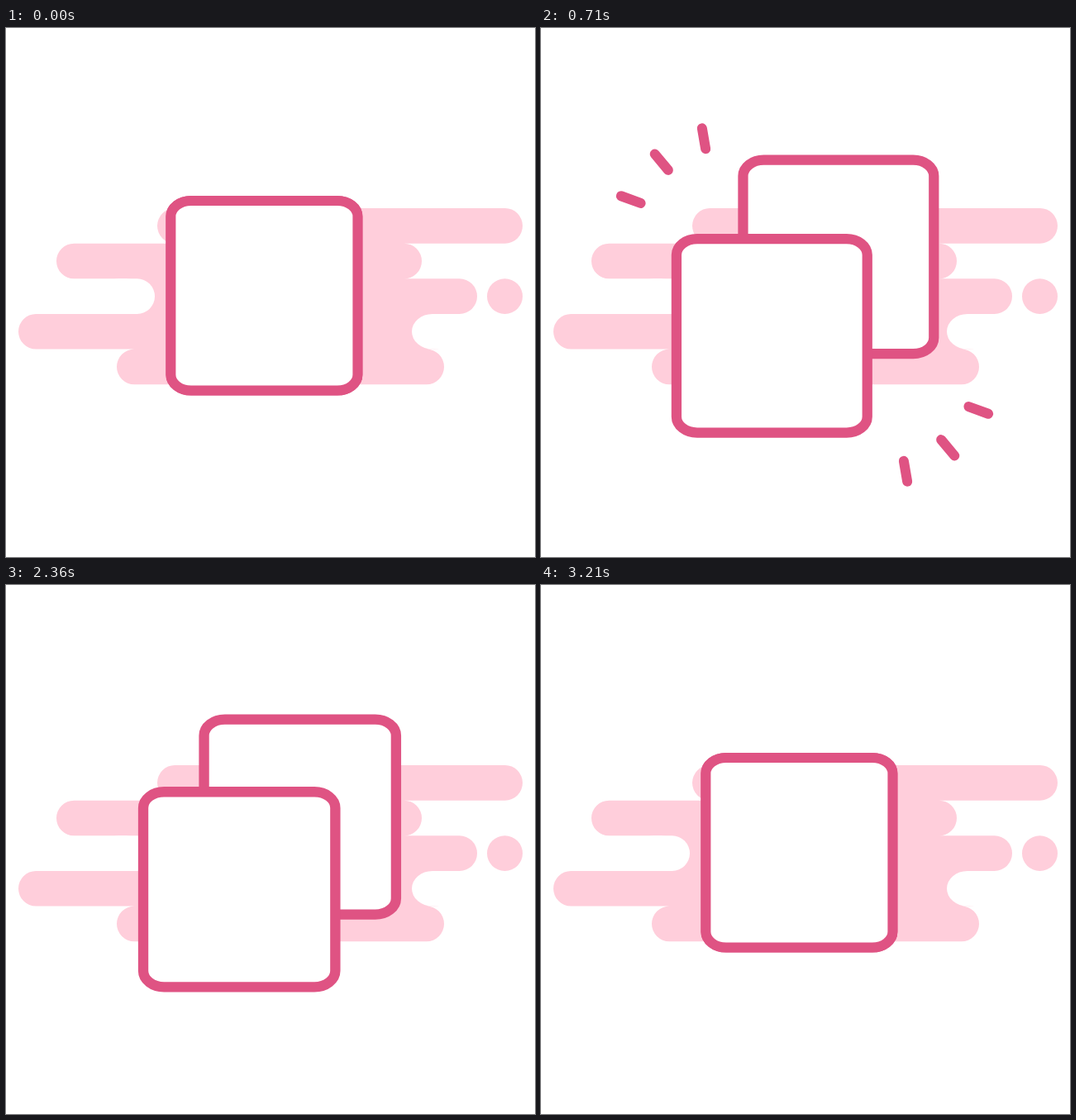
Animation, 640 px wide and 640 px high, one loop 3570 ms. Source, as an HTML page with a canvas:

```html
<!DOCTYPE html>
<html lang="en">
<head>
<meta charset="utf-8">
<title>Split squares</title>
<style>
html, body { margin: 0; width: 100%; height: 100%; overflow: hidden; background: #fff; }
canvas { display: block; width: 100vw; height: 100vh; }
</style>
</head>
<body>
<canvas id="stage"></canvas>
<script>
const SIZE = 640, LOOP = 3570, STEPS = 50;
const PINK = '#df5383', PALE = '#ffcedb', WHITE = '#fff';
const STROKE = 12, GROW = 0.098;
const CENTER = { x: 312.4, y: 323.7 };
const BACK = { x: 61, y: -58.7, bow: -1.7 };
const FRONT = { x: -42.5, y: 62, bow: 0.7 };
const TOP = 218, ROW = 42.65;

const canvas = document.getElementById('stage');
const ctx = canvas.getContext('2d');
const ratio = window.devicePixelRatio || 1;
canvas.width = canvas.height = SIZE * ratio;

// Smooth 0..1 ramp between two steps
function ramp(k, from, to) {
  const u = Math.min(1, Math.max(0, (k - from) / (to - from)));
  return u * u * (3 - 2 * u);
}

function addBar(path, row, left, right, rx = ROW / 2) {
  path.roundRect(left, TOP + row * ROW, right - left, ROW, { x: rx, y: ROW / 2 });
}

const bars = new Path2D();
[[183, 625], [61, 503], [130, 570], [15, 540], [134, 530]]
  .forEach(([left, right], row) => addBar(bars, row, left, right));
addBar(bars, 2, 582, 625);

const notches = new Path2D();
addBar(notches, 2, 115, 180);
addBar(notches, 3, 491, 560, 25);

const card = new Path2D();
card.roundRect(-113, -114.8, 226, 229.6, { x: 24.5, y: 19 });

function fill(path, color) {
  ctx.fillStyle = color;
  ctx.fill(path);
}

// Three rays fan out from an arc, on two opposite sides
function drawRays(k) {
  const head = ramp(k, 4.3, 10.3) * 54;
  const tail = ramp(k, 6.9, 12.9) * 54;
  if (head - tail < 0.1) return;
  ctx.lineCap = 'round';
  ctx.beginPath();
  for (const side of [1, -1]) {
    for (let i = -1; i <= 1; i++) {
      const place = (50 + 17.1 * i) * Math.PI / 180;
      const aim = (50.2 + 30 * i) * Math.PI / 180;
      const x = 66 + 126 * Math.cos(place), y = 44.8 + 126 * Math.sin(place);
      for (const reach of [tail, head]) {
        ctx[reach === tail ? 'moveTo' : 'lineTo'](
          319 + side * (x + reach * Math.cos(aim)),
          335 + side * (y + reach * Math.sin(aim)));
      }
    }
  }
  ctx.stroke();
}

function drawCard(shift, spread, scale) {
  const bow = shift.bow * Math.sin(Math.PI * spread);
  ctx.save();
  ctx.translate(CENTER.x + shift.x * spread, CENTER.y + shift.y * spread + bow);
  ctx.scale(scale, scale);
  fill(card, WHITE);
  ctx.stroke(card);
  ctx.restore();
}

function draw(k) {
  const spread = ramp(k, 3.15, 13) - ramp(k, 29.3, 39.7);
  const scale = 1 + GROW * (ramp(k, 0, 4.2) - ramp(k, 4.2, 12.5) +
    ramp(k, 30, 38.5) - ramp(k, 38.5, 45));
  ctx.setTransform(ratio, 0, 0, ratio, 0, 0);
  ctx.fillStyle = WHITE;
  ctx.fillRect(0, 0, SIZE, SIZE);
  fill(bars, PALE);
  fill(notches, WHITE);
  ctx.strokeStyle = PINK;
  ctx.lineWidth = STROKE;
  drawRays(k);
  drawCard(BACK, spread, scale);
  drawCard(FRONT, spread, scale);
}

function tick() {
  const t = performance.now() % LOOP;
  draw(Math.floor((t + 5) * STEPS / LOOP) % STEPS);
  requestAnimationFrame(tick);
}
tick();
</script>
</body>
</html>
```
